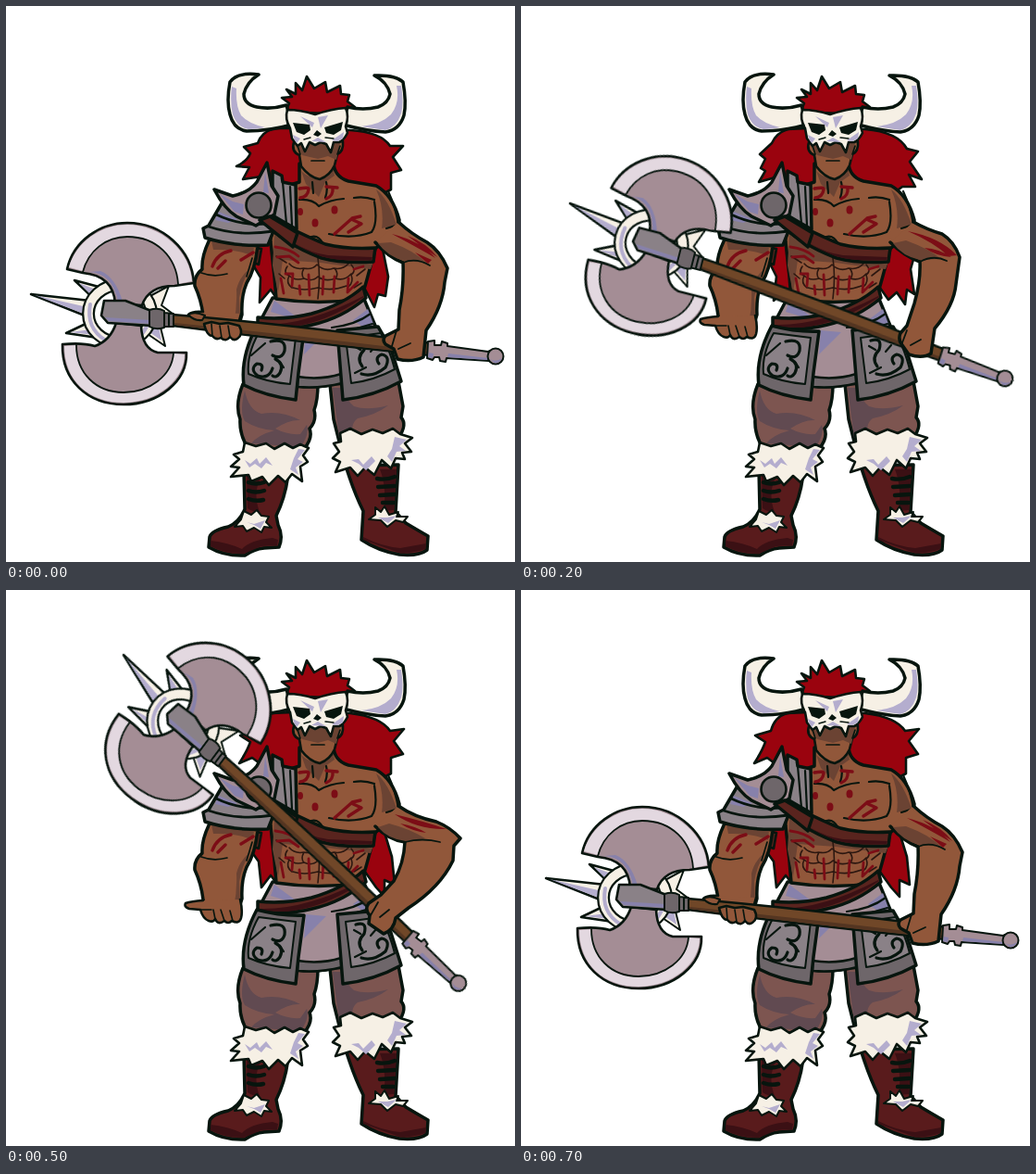
Animation of 550x600 px, one loop 800 ms. Source, as an HTML page:

```html
<!DOCTYPE html>
<html lang="en">
<head>
<meta charset="utf-8">
<title>Axe warrior</title>
<style>
html, body { margin: 0; width: 100%; height: 100%; overflow: hidden; background: #fff; }
svg { display: block; width: 100vw; height: 100vh; }
path, circle, ellipse { stroke-linejoin: round; stroke-linecap: round; }
.o { stroke: #07150e; stroke-width: 3.5; }
.n { stroke: #07150e; stroke-width: 2.6; }
.t { stroke: #07150e; stroke-width: 2; }
.l { fill: none; stroke: #07150e; stroke-width: 2.2; }
.f { fill: none; stroke: #2c1710; stroke-width: 1.6; }
.m { fill: none; stroke: #7c0d16; stroke-width: 3.4; }
.ink { fill: #7c0d16; }
.skin { fill: #91573a; }
.dim { fill: #6b4333; }
.hair { fill: #9a030e; }
.bone { fill: #f6f0e5; }
.lav { fill: #b4adce; }
.steel { fill: #a48d95; }
.iron { fill: #8a8187; }
.slate { fill: #6e666a; }
.dusk { fill: #8781ab; }
.pale { fill: #e3d8e0; }
.strap { fill: #59241e; }
.boot { fill: #591b1c; }
.deep { fill: #3b1014; }
.pants { fill: #7d5550; }
.fold { fill: #614a51; }
.wood { fill: #704728; }

.s { animation: .8s step-end infinite; }
#axe { transform-origin: 27px 311px; animation-name: swing; }
.openHand { animation-name: open; }
.gripHand { animation-name: grip; }
.armLow { animation-name: low; }
.armMid { animation-name: mid; }
.armUp { animation-name: up; }
.armTop { animation-name: top; }
.hairA { animation-name: hairA; }
.hairB { animation-name: hairB; }
.hairC { animation-name: hairC; }
@keyframes swing {
  0%, 100% { transform: none; }
  12.5% { transform: translate(11px, -43px) rotate(5.4deg); }
  25% { transform: translate(26px, -98px) rotate(14.3deg); }
  37.5% { transform: translate(63px, -171px) rotate(25.2deg); }
  50% { transform: translate(86px, -215px) rotate(32.5deg); }
  62.5% { transform: translate(100px, -241px) rotate(36.8deg); }
  75% { transform: translate(8px, -23px) rotate(3.4deg); }
  87.5% { transform: none; }
}
@keyframes open { 0%, 87.5%, 100% { visibility: hidden; } 12.5% { visibility: visible; } }
@keyframes grip { 0%, 87.5%, 100% { visibility: visible; } 12.5% { visibility: hidden; } }
@keyframes low { 0%, 75%, 100% { visibility: visible; } 25% { visibility: hidden; } }
@keyframes mid { 0%, 37.5%, 100% { visibility: hidden; } 25% { visibility: visible; } }
@keyframes up { 0%, 50%, 100% { visibility: hidden; } 37.5% { visibility: visible; } }
@keyframes top { 0%, 75%, 100% { visibility: hidden; } 50% { visibility: visible; } }
@keyframes hairA { 0%, 50%, 100% { visibility: visible; } 12.5%, 62.5% { visibility: hidden; } }
@keyframes hairB { 0%, 37.5%, 87.5%, 100% { visibility: hidden; } 25%, 75% { visibility: visible; } }
@keyframes hairC { 0%, 25%, 50%, 75%, 100% { visibility: hidden; } 12.5%, 37.5%, 62.5%, 87.5% { visibility: visible; } }
</style>
</head>
<body>
<svg viewBox="0 0 550 600" preserveAspectRatio="none">

<!-- hair behind the body -->
<g class="hair n">
  <g class="s hairA">
    <path d="M310 132L290 132Q276 136 272 148L257 152L264 159Q261 167 249 173L263 174L256 187L276 184L300 215L385 215L416 198L416 180L427 177L418 163L429 151L415 151Q405 136 372 134Z"/>
    <path d="M262 245L266 278L275 293L274 320L286 306L294 318L300 250ZM390 250L385 300L398 325L402 311L410 313L413 292L407 262Z"/>
  </g>
  <g class="s hairB">
    <path d="M310 132L288 133Q276 137 271 148L258 160L264 165L259 175L264 178L257 190L278 184L300 215L385 215L412 195L426 195L419 182L433 187L420 168L429 157L417 154Q407 136 372 133Z"/>
    <path d="M266 250L270 280L276 292L273 318L285 306L294 320L300 250ZM390 250L385 300L397 317L406 309L415 322L417 306L425 311L421 284L425 270L407 255Z"/>
  </g>
  <g class="s hairC">
    <path d="M310 132L287 133Q274 137 270 152L253 157L264 164Q261 173 252 187L266 181L278 190L300 215L385 215L416 198L416 181L429 177L419 163L430 150L415 152Q405 137 372 133Z"/>
    <path d="M262 250L265 282L273 293L276 321L286 308L294 318L300 250ZM390 250L385 300L400 321L409 331L409 313L420 318L417 288L407 255Z"/>
  </g>
</g>

<!-- legs -->
<path class="pants o" d="M256 408Q247 430 253 446Q252 463 262 478L322 478Q332 466 328 456Q336 448 333 436Q337 425 337 408Z"/>
<path class="fold" d="M258 415Q252 438 258 448Q272 457 290 458Q272 463 265 472L318 476Q328 463 325 452L318 462Q304 463 291 456Q306 446 318 447Q297 436 276 440Q262 436 258 415Z"/>
<path class="pants o" d="M350 408L354 446L360 470L424 466Q434 452 427 444L429 432L424 405Z"/>
<path class="fold" d="M353 412L360 466L376 464Q371 452 380 445Q400 441 413 431Q390 437 376 432Q366 424 366 412Z"/>

<!-- boots -->
<g class="boot o">
  <path d="M257 500L258 543Q252 557 240 562Q222 566 220 573L219 584Q236 594 258 593Q268 586 279 585L295 584Q300 572 294 560L292 550Q302 530 305 505Z"/>
  <path d="M367 496Q376 525 386 545L384 576Q402 588 425 592Q446 594 455 587L456 572Q442 564 432 558L421 546L424 495Z"/>
</g>
<path class="deep" d="M260 505L261 542Q266 546 274 546Q266 525 276 508ZM221 577Q240 579 255 586Q264 576 288 574L294 576L293 582L276 583L257 591Q236 591 221 583ZM404 500Q412 520 408 545L419 544L422 500ZM386 573Q405 583 426 585L454 580L453 586Q440 591 425 590L386 576Z"/>
<path class="l" style="stroke-width:4.4" d="M262 514Q270 517 279 514M262 523Q270 526 279 523M262 532Q270 535 278 533M401 510Q410 512 420 508M402 519L420 518M404 528L420 527M407 536L419 536"/>
<g class="bone t">
  <path d="M257 545L265 549L271 544L276 550L284 551L281 557L287 563L279 562L276 568L268 563L260 567L256 561L247 562L254 554Z"/>
  <path d="M399 541L405 546L409 540L414 549L424 546L422 551L434 551L429 557L421 555L412 562L405 555L392 554L399 549Z"/>
</g>
<path class="lav" d="M260 557L268 559L280 555L275 564L268 560ZM402 552L412 552L422 550L413 558Z"/>

<!-- fur cuffs -->
<g class="bone n">
  <path d="M258 471L270 475L281 472L290 478L301 472L310 477L318 473L327 477L321 485L326 492L318 497L320 513L309 505L302 514L294 507L284 517L277 508L265 513L262 506L243 508L252 498L243 497L252 489L246 484L256 481Z"/>
  <path d="M361 461L372 456L384 462L396 457L407 461L418 456L426 462L439 466L431 472L438 481L428 482L431 489L421 488L416 499L406 490L398 506L388 498L380 507L372 498L356 503L361 492L353 488L360 481L354 472L362 470Z"/>
</g>
<path class="lav" d="M316 478L323 479L315 489L321 492L313 498L316 506L307 500L311 488ZM258 490L264 494L271 488L274 494L281 487L288 496L281 493L276 499L269 494L263 498ZM420 465L433 468L425 475L432 480L422 481L417 492L412 486L417 478ZM373 490L381 489L386 495L395 486L399 491L389 501L381 494Z"/>

<!-- waist cloth -->
<path class="steel o" d="M288 315L386 314L399 345L394 385L360 406Q340 413 315 410L276 380L272 345Z"/>
<path class="dusk" d="M290 318L320 340L286 330ZM324 350L346 352L322 376ZM375 339L391 327L397 343L390 349Z"/>
<path class="slate n" d="M315 400Q340 404 362 397L363 407Q340 413 315 411Z"/>
<path class="l" d="M352 347Q378 344 394 332M368 351L396 343"/>

<!-- torso -->
<path class="skin o" d="M317 170L317 190L295 197L284 215L286 255L290 292L292 316Q338 323 384 316L390 295L399 262L424 240L425 231Q418 204 400 194L370 189Q354 184 354 168Z"/>
<path class="dim" d="M319 178Q335 194 353 174L355 183L345 190L338 206L324 192ZM290 247Q320 263 340 260L397 276L394 284Q370 281 340 277L299 274L294 310L288 280ZM400 198Q413 208 422 236L406 240Q409 218 400 198Z"/>
<path class="l" d="M317 209Q331 208 338 216Q350 209 365 208M398 209Q387 205 376 207M413 200Q421 217 424 236L411 240M398 211Q402 235 395 244Q375 252 349 246M327 250Q337 245 343 257M346 190Q348 199 345 207M331 190L332 202"/>
<path class="f" d="M337 272Q340 292 337 316M306 278Q312 285 322 283Q331 285 336 279Q344 287 354 283Q364 285 370 278M306 291Q312 297 322 294Q331 298 337 292Q345 298 356 294Q366 297 373 289M310 304Q322 308 337 304Q353 308 368 302M304 281Q299 288 306 291Q302 299 309 304M373 279Q379 286 373 290Q376 298 370 303M322 283Q318 290 322 294M355 283Q360 289 356 294M292 270L303 277M295 289L301 294M388 284L379 291M384 299L376 304"/>
<path class="m" d="M317 197Q328 195 327 198Q326 206 318 207M346 195L358 196M353 196Q354 205 346 208M355 246L373 230L384 235L370 244M374 229L383 227"/>
<path class="m" style="stroke-width:2.8" d="M291 260Q307 262 316 270M293 271L306 270L316 277M302 289L310 289L309 302M327 290L328 312M343 292L342 311M355 292L354 309M370 294L369 309L380 298M297 294L300 310M376 284L386 281M317 302L318 311"/>
<g class="ink"><ellipse cx="318" cy="222" rx="3" ry="4"/><ellipse cx="334" cy="234" rx="3.5" ry="4.5"/><ellipse cx="355" cy="220" rx="3.5" ry="4.5"/></g>

<!-- face and skull helm -->
<path class="skin n" d="M311 147Q308 157 317 161L319 173Q328 185 339 187Q350 183 355 172L358 160Q365 157 364 146Z"/>
<path class="dim" d="M313 147L361 148L357 166L348 162L337 165L320 161Z"/>
<path class="l" d="M330 167L344 167M315 151L318 160M361 151L358 160" style="stroke-width:1.7"/>
<path class="hair n" d="M302 114L306 105L298 99L309 98L303 90L313 95L313 83L320 91L325 76L333 89L345 82L347 93L361 86L362 95L371 96L369 103L377 109L366 117Z"/>
<g class="bone o">
  <path d="M273 74Q250 71 242 82Q238 103 242 117Q246 133 260 135Q284 135 309 128L303 107Q286 112 271 109Q257 106 257 95Q260 82 273 74Z"/>
  <path d="M398 75Q421 74 429 82Q433 104 430 118Q425 134 410 136Q390 135 364 128L369 109Q386 113 402 109Q413 105 415 95Q412 82 398 75Z"/>
</g>
<path class="lav" d="M244 87Q242 104 245 117Q250 131 262 133Q270 133 280 131Q262 127 254 118Q248 108 249 89ZM427 86Q430 104 427 116Q422 131 410 134L384 130Q405 128 416 117Q426 104 422 86Z"/>
<path class="bone n" d="M304 112Q318 112 334 117Q352 111 367 110Q371 119 367 130L369 137Q365 145 360 147L354 147L351 158L346 149L340 147L334 150L328 147L323 157L319 148L315 151L309 143L307 132Q301 122 304 112Z"/>
<path class="lav" d="M318 119L333 126L331 131ZM337 120L348 118L340 132ZM330 146L337 142L346 147ZM310 139L318 143L314 148L311 143ZM352 145L365 136L364 143L358 146Z"/>
<path fill="#07150e" d="M310 126L328 128L329 134L322 139L314 136ZM344 131L364 125L362 134L354 139L346 137ZM332 139L336 134L341 138L337 141Z"/>
<path class="l" style="stroke-width:1.4" d="M322 144L329 142M345 142L354 143"/>

<!-- chest strap and shoulder plates -->
<path class="strap o" d="M282 226Q311 243 345 257Q370 263 399 261L397 276Q363 278 341 272Q306 259 280 236Z"/>
<path class="deep" d="M310 255Q330 267 348 269L396 271L395 274Q360 276 340 270Q322 263 310 255Z"/>
<path class="strap n" d="M260 259L276 262L273 279L265 276Z"/>

<!-- arm on the left -->
<path class="skin o" d="M220 252Q211 270 212 284Q203 291 204 302Q211 317 213 334L218 350L250 350L255 333Q254 313 260 299Q269 285 272 259Z"/>
<path class="dim" d="M222 253L268 259L267 270Q250 262 224 263ZM265 282Q255 296 252 315L253 337L246 343Q250 324 249 306Q252 292 265 282Z"/>
<path class="l" d="M211 288Q224 293 239 289M266 272L260 292" style="stroke-width:1.7"/>
<path class="m" d="M223 281Q228 267 243 264M229 283L237 275M254 274L267 266"/>
<g class="s openHand">
  <path class="skin n" d="M213 335Q200 336 194 338Q192 342 198 344L210 345Q213 355 219 357Q224 359 226 355Q229 362 236 357Q240 361 244 357Q252 361 254 354Q256 346 253 334"/>
  <path class="l" style="stroke-width:1.6" d="M211 345L222 345M226 355L224 345M236 357L232 345M245 357L242 346"/>
</g>
<g class="s gripHand">
  <path class="skin n" d="M213 330Q201 329 197 333L203 342L249 350L254 332"/>
</g>

<path class="iron o" d="M288 178L298 183L299 190L313 193L314 241L288 226Z"/>
<path class="l" d="M299 190L303 235M307 195L309 237"/>
<path class="iron o" d="M233 213L219 237L213 240L215 250Q246 260 283 258L291 238Q275 233 262 218Z"/>
<path class="dusk" d="M230 222L250 230L240 234L226 231Z"/>
<path class="l" style="stroke-width:2.8" d="M219 238Q250 249 289 243M227 225Q252 237 280 235"/>
<path class="steel o" d="M225 198L245 205Q263 201 271 190L282 169L287 194L294 205L290 225L270 237L249 227Q236 219 225 198Z"/>
<path class="dusk" d="M231 203L245 211L257 214L256 225L247 222ZM280 179L284 202L278 201Z"/>
<circle class="slate n" cx="273" cy="215" r="13.5"/>
<path class="strap o" d="M274 231L285 227L315 245L310 260Z"/>

<!-- belt and skirt panels -->
<path class="strap o" d="M272 336Q302 339 330 332Q365 322 386 303L389 315Q363 337 331 344Q303 351 272 347Z"/>
<path class="deep" d="M275 344Q325 345 386 313L387 314Q345 343 303 347L275 346Z"/>
<path class="slate o" d="M271 345Q297 352 322 351L316 396L313 425Q280 421 257 409Q253 379 271 345Z"/>
<path class="iron t" d="M273 353L313 358L307 408Q282 406 262 397Q260 376 273 353Z"/>
<path class="slate o" d="M358 350L402 346L416 370L427 405Q398 421 364 425Z"/>
<path class="iron t" d="M367 358L405 353Q415 372 420 392Q398 404 373 407Z"/>
<path class="l" style="stroke-width:3.2" d="M286 362Q303 358 301 372Q298 382 288 377M291 381Q301 386 296 396Q292 402 288 399M288 391Q284 403 272 399Q263 392 271 386Q279 386 276 393M378 361Q391 357 387 371Q378 380 385 389M384 397Q397 401 410 390Q416 378 406 376Q398 379 403 386"/>
<path class="l" d="M265 377L280 364M296 384L300 390M376 367L383 371M377 396L389 390M400 366L394 373"/>

<!-- axe -->
<g id="axe" class="s">
  <path class="bone t" d="M152 315L176 302L168 323L184 335L166 343L172 367L153 354Z"/>
  <path class="bone n" d="M92 313L74 296L104 304ZM86 343L65 353L99 358Z"/>
  <path class="bone n" d="M27 311L91 318L85 334Z"/>
  <path class="lav" d="M31 312L88 325L84 332ZM79 299L97 306L91 311ZM69 352L92 349L95 355ZM155 338L181 335L164 341L168 361L155 352Z"/>
  <ellipse cx="123" cy="332" rx="34" ry="31" fill="none" stroke="#07150e" stroke-width="14"/>
  <ellipse cx="123" cy="332" rx="34" ry="31" fill="none" stroke="#f6f0e5" stroke-width="9.5"/>
  <path d="M91 322Q86 348 108 361M145 356Q154 347 155 333" fill="none" stroke="#b4adce" stroke-width="4"/>
  <path class="steel n" d="M66 284C73 253 102 234 131 234C169 234 201 263 203 299L182 302Q154 302 147 323L118 321Q116 291 83 288Z"/>
  <path class="pale" d="M68 282C76 254 103 236 131 236C167 236 199 264 201 297L186 300C184 271 163 249 131 249C108 249 89 264 83 286Z"/>
  <path class="dusk" d="M90 287Q115 288 121 319L126 319Q118 292 102 286Z"/>
  <path class="l" style="stroke-width:1.8" d="M83 287C89 264 108 249 131 249C163 249 184 271 186 300"/>
  <path class="steel n" d="M61 365Q83 363 96 367Q113 361 119 342L146 345Q147 370 164 374L195 374C196 405 165 430 127 430C88 430 60 404 61 365Z"/>
  <path class="pale" d="M63 367L76 366C76 396 97 417 127 417C155 417 179 399 181 375L193 376C193 403 164 428 127 428C90 428 63 405 63 367Z"/>
  <path class="l" style="stroke-width:1.8" d="M76 366C76 396 97 417 127 417C155 417 179 399 181 375"/>
  <path class="wood n" d="M180 333Q300 343 460 364L459 377Q320 363 180 345Z"/>
  <path fill="#543521" d="M182 342Q310 355 458 373L458 376Q320 362 182 344Z"/>
  <path class="iron n" d="M106 318L129 318L157 329L158 345L110 342L103 334Z"/>
  <path class="dusk" d="M107 336L157 339L157 343L111 340Z"/>
  <path class="slate t" d="M155 328Q164 325 171 329L171 347Q162 350 155 346ZM171 331L181 332L181 346L171 346ZM176 332L176 346"/>
  <path class="steel t" d="M456 362L463 361L463 366L470 366L471 362L477 364L477 367L521 373L523 372L522 383L476 380L475 384L469 383L468 379L463 379L461 382L455 380Z"/>
  <path class="dusk" d="M478 375L521 380L520 382L477 379ZM457 374L462 375L461 380L456 379Z"/>
  <circle class="steel t" cx="529" cy="378" r="8.5"/>
  <path class="dusk" d="M523 381Q529 385 536 380Q533 386 528 385Z"/>
</g>

<g class="s gripHand">
  <path class="skin n" d="M214 343L222 341L231 343L240 342L252 345Q257 354 250 359Q246 362 242 357Q238 363 232 358Q227 361 223 356Q217 356 214 343Z"/>
  <path class="l" style="stroke-width:1.6" d="M223 356L222 343M233 358L231 345M242 357L240 345"/>
  <path class="skin t" d="M197 333Q204 329 215 334L212 339Q203 340 197 333Z"/>
</g>

<!-- arm on the right, one pose per step -->
<g class="s armLow">
  <path class="skin o" d="M399 255Q413 271 429 277Q430 303 425 328L424 349L410 356Q406 360 410 365L419 370L423 381Q438 385 451 379L454 350Q472 324 474 298L477 283Q469 264 455 255Q438 246 424 233"/>
  <path class="dim" d="M402 256L416 255Q441 264 454 277L430 275Q412 270 402 256Z"/>
  <path class="l" style="stroke-width:1.8" d="M429 277Q443 271 458 280M422 350L417 367M424 370L437 364"/>
  <path class="ink" d="M417 246Q449 254 464 272Q447 262 417 246ZM434 248Q455 256 466 271Q452 262 434 248ZM442 266L460 274L456 278Z"/>
</g>
<g class="s armMid">
  <path class="skin o" d="M399 255Q414 270 431 276Q432 297 425 321L417 345L410 353Q407 360 412 366L419 376Q434 381 443 375L447 348Q468 323 470 300L474 271Q468 254 455 246Q438 241 424 233"/>
  <path class="dim" d="M402 256L416 253Q441 262 454 273L431 274Q412 270 402 256Z"/>
  <path class="l" style="stroke-width:1.8" d="M431 276Q446 268 460 275M417 350L411 366M421 366L432 360"/>
  <path class="ink" d="M418 243Q453 250 471 269L462 270Q446 255 418 243ZM436 261Q452 262 465 271Q449 270 436 261Z"/>
</g>
<g class="s armUp">
  <path class="skin o" d="M399 255Q414 271 433 275Q432 294 421 315L404 336L398 347Q399 356 407 359L414 370Q425 372 432 367L437 349Q474 321 481 294L480 277L487 268Q476 250 460 245Q440 241 424 233"/>
  <path class="dim" d="M402 256L416 252Q443 260 459 269L433 273Q412 270 402 256Z"/>
  <path class="l" style="stroke-width:1.8" d="M433 275Q450 266 465 271M409 342L401 354M413 357L423 349"/>
  <path class="ink" d="M417 236Q455 245 475 262Q445 254 417 236ZM430 252Q455 254 470 264Q446 262 430 252Z"/>
</g>
<g class="s armTop">
  <path class="skin o" d="M399 255Q414 270 431 272Q430 295 419 314L405 329L392 338Q387 345 393 351L392 360L408 371Q419 367 421 354L435 343Q469 321 483 292L484 276L491 268Q480 256 465 250Q441 245 424 233"/>
  <path class="dim" d="M402 256L414 252Q437 258 453 268L432 271Q413 269 402 256Z"/>
  <path class="l" style="stroke-width:1.8" d="M431 272Q450 267 469 272M402 337L394 351M404 353L414 345"/>
  <path class="ink" d="M420 242Q453 250 476 258Q445 259 420 242ZM426 252Q443 255 454 262Q438 260 426 252Z"/>
</g>
</svg>
</body>
</html>
```
